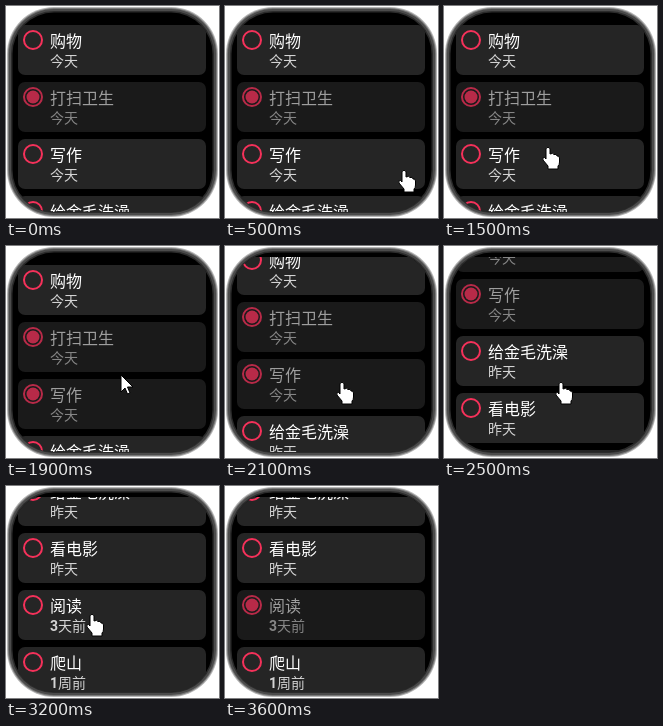
These frames come from a looping animation (213 px wide and 212 px high, 4100 ms). An HTML page with a canvas:

```html
<!DOCTYPE html>
<html lang="zh-CN">
<head>
<meta charset="utf-8">
<style>
html, body { margin: 0; width: 100%; height: 100%; overflow: hidden; background: #fff; }
canvas { display: block; width: 213px; height: 212px; }
</style>
</head>
<body>
<canvas></canvas>
<script>
const canvas = document.querySelector('canvas');
const ctx = canvas.getContext('2d');
const dpr = window.devicePixelRatio || 1;
canvas.width = 213 * dpr;
canvas.height = 212 * dpr;

const LOOP = 4100, PITCH = 57, ROW_H = 50;
const CJK = '"Noto Sans CJK SC", "Noto Sans CJK", sans-serif';

// title, day label, time at which the task is ticked off
const tasks = [
  ['购物', '今天', Infinity],
  ['打扫卫生', '今天', 0],
  ['写作', '今天', 1700],
  ['给金毛洗澡', '昨天', Infinity],
  ['看电影', '昨天', Infinity],
  ['阅读', '3天前', 3400],
  ['爬山', '1周前', Infinity]
];

// time, x, y of the pointer tip
const path = [
  [200, 207, 121], [400, 190, 150], [600, 168, 178], [700, 162, 184],
  [800, 161, 178], [900, 161, 178], [1000, 159, 174], [1200, 148, 165],
  [1500, 104, 141], [1600, 52, 146], [1700, 28, 148], [1800, 70, 138],
  [1900, 115, 129], [2100, 117, 136], [2500, 117, 136], [2700, 116, 136],
  [2900, 114, 135], [3000, 110, 134], [3200, 86, 128], [3300, 50, 124],
  [3400, 27, 122], [3500, 190, 60]
];

// time, scroll offset
const scrollKeys = [
  [2000, 0], [2100, 20], [2200, 55], [2300, 86], [2400, 98], [2500, 100],
  [2600, 130], [2700, 175], [2800, 194], [2900, 200]
];

const hand = new Path2D('M-2 1.5Q0-1 2 1.5V7Q5 5.5 6 7.5Q9 6.5 9 9Q11.5 8.5 11.5 11V15Q11.5 18 10 19V22H0V19L-5 13Q-6 10-3.5 10.5L-2 12Z');
const arrow = new Path2D('M0 0V17L4 13L6.5 19L9 18L6.5 12H12Z');

function sample(keys, t, i) {
  if (t <= keys[0][0]) return keys[0][i];
  for (let k = 1; k < keys.length; k++) {
    const a = keys[k - 1], b = keys[k];
    if (t <= b[0]) return a[i] + (b[i] - a[i]) * (t - a[0]) / (b[0] - a[0]);
  }
  return keys[keys.length - 1][i];
}

function rounded(x, y, w, h, r) {
  ctx.beginPath();
  ctx.roundRect(x, y, w, h, r);
}

function shell(inset, color) {
  rounded(1 + inset, 1 + inset, 211 - 2 * inset, 210 - 2 * inset, 47 - inset);
  ctx.fillStyle = color;
  ctx.fill();
}

function text(str, x, y, font, color) {
  ctx.font = font;
  ctx.fillStyle = color;
  ctx.fillText(str, x, y);
  return ctx.measureText(str).width;
}

function drawTask([title, day, doneAt], y, t) {
  const done = t >= doneAt;
  ctx.globalAlpha = done ? 0.72 : 1;
  rounded(12, y, 188, ROW_H, 7);
  ctx.fillStyle = '#252525';
  ctx.fill();

  ctx.strokeStyle = ctx.fillStyle = '#f5315a';
  ctx.lineWidth = 2;
  ctx.beginPath();
  ctx.arc(27, y + 15, 9, 0, 7);
  ctx.stroke();
  if (done) {
    ctx.beginPath();
    ctx.arc(27, y + 15, 6.5, 0, 7);
    ctx.fill();
  }

  ctx.globalAlpha = done ? 0.58 : 1;
  text(title, 44, y + 22, '16px ' + CJK, '#fff');
  let x = 44;
  const digits = day.match(/^\d+/);
  if (digits) {
    x += text(digits[0], x, y + 41, 'bold 14px Roboto, sans-serif', '#d4d4d4');
    day = day.slice(digits[0].length);
  }
  text(day, x, y + 41, '14px ' + CJK, '#d4d4d4');
  ctx.globalAlpha = 1;
}

function drawPointer(t, scroll) {
  if (t < 200 || t >= 3600) return;
  const x = sample(path, t, 1), y = sample(path, t, 2);
  const overRow = x > 12 && x < 200 && (y + scroll - 19) % PITCH < ROW_H;
  const shape = overRow ? hand : arrow;
  ctx.save();
  ctx.translate(x, y);
  ctx.fillStyle = '#fff';
  ctx.strokeStyle = '#000';
  ctx.lineWidth = 1;
  ctx.fill(shape);
  ctx.stroke(shape);
  ctx.restore();
}

function draw(now) {
  const t = Math.floor(now % LOOP / 100) * 100;
  const scroll = sample(scrollKeys, t, 1);
  ctx.setTransform(dpr, 0, 0, dpr, 0, 0);
  ctx.fillStyle = '#fff';
  ctx.fillRect(0, 0, 213, 212);
  shell(0, '#b5b5b5');
  shell(1, '#777');
  shell(2, '#4b4b4b');
  shell(4, '#2b2b2b');
  shell(5.5, '#000');

  ctx.save();
  rounded(6.5, 6.5, 200, 199.5, 41);
  ctx.clip();
  ctx.beginPath();
  ctx.rect(12, 11, 188, 195);
  ctx.clip();
  tasks.forEach((task, i) => drawTask(task, 19 + i * PITCH - scroll, t));
  ctx.restore();

  drawPointer(t, scroll);
}

const start = performance.now();
function tick() {
  draw(performance.now() - start);
  requestAnimationFrame(tick);
}
tick();
</script>
</body>
</html>
```
